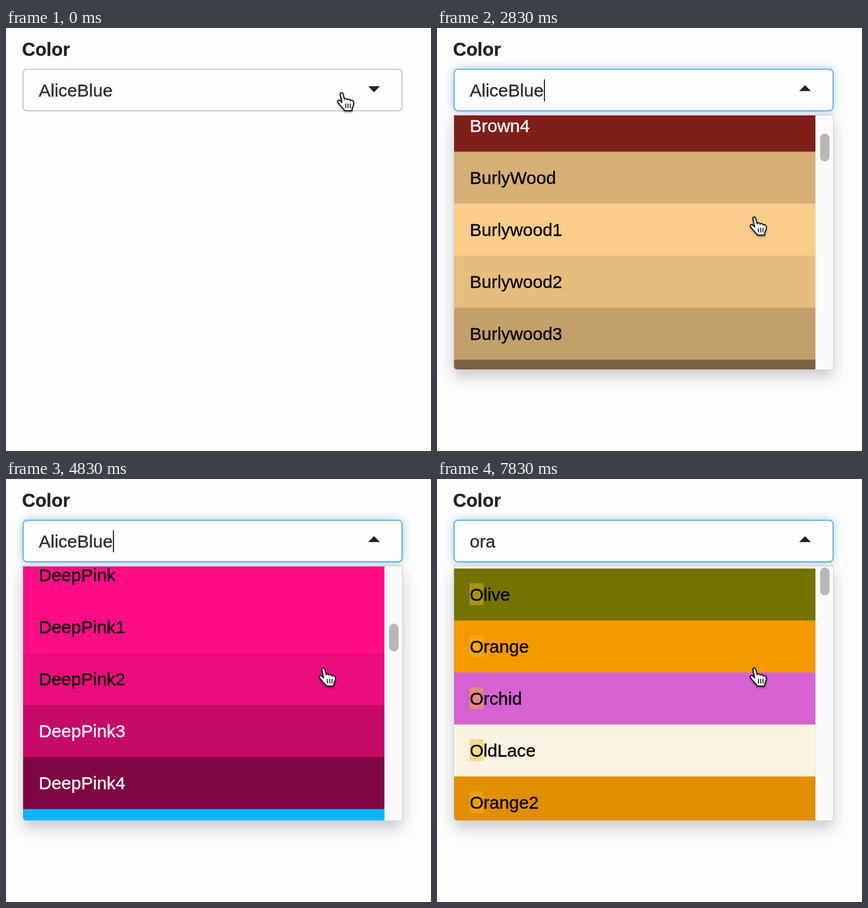
An HTML page that plays this animation: 720 px wide and 716 px high, repeating every 8000 ms.

```html
<!DOCTYPE html>
<html lang="en">
<head>
<meta charset="utf-8">
<title>Color select</title>
<style>
html, body { margin: 0; width: 100%; height: 100%; overflow: hidden; background: #fefdfe; }
svg { display: block; width: 100vw; height: 100vh; }
text {
  font: 30px "Liberation Sans", Arial, sans-serif; white-space: pre;
  fill: currentColor; stroke: currentColor; stroke-width: .4;
}
#label { font-size: 31px; font-weight: bold; color: #222; }
#value { color: #2d2d2f; }
#field { fill: #fefdfe; stroke: #c6c5c9; stroke-width: 1.9; }
#field.focus { stroke: #66a9e2; filter: drop-shadow(0 0 8px rgba(102, 175, 233, .6)); }
#panel { fill: #fefdfe; stroke: #d3d2d5; stroke-width: 1.5; filter: drop-shadow(0 12px 12px rgba(0, 0, 0, .2)); }
#hand { filter: drop-shadow(0 2px 1.5px rgba(0, 0, 0, .4)); }
</style>
</head>
<body>
<svg viewBox="0 0 720 716">
  <defs><clipPath id="view"><path d="M29 148H671V572q0 6 -6 6H35q-6 0 -6 -6Z"/></clipPath></defs>
  <text id="label" x="27.3" y="47">Color</text>
  <rect id="field" x="28.9" y="69.9" width="642.2" height="70.4" rx="7"/>
  <text id="value" x="55.5" y="115.7"></text>
  <path id="caret" d="M182 87V124" stroke="#333" stroke-width="2"/>
  <path id="arrow" fill="#222"/>
  <g id="menu">
    <path id="panel" d="M28.7 147.3H671.3V571q0 7.5 -7 7.5H35.7q-7 0 -7 -7.5Z"/>
    <g clip-path="url(#view)">
      <g id="all"></g>
      <g id="found"></g>
      <rect x="641" y="148" width="30" height="431" fill="#fafafb"/>
      <path d="M641.7 148V579" stroke="#e6e5e8"/>
      <rect id="thumb" x="649" width="16" height="47" rx="8" fill="#b9b7bb"/>
    </g>
  </g>
  <g id="hand" stroke="#111" stroke-width="1.9" stroke-linejoin="round" stroke-linecap="round">
    <path fill="#fff" d="M5.2 4.5C4.6 1 9 .2 10 3.6L12.6 13C13.6 10.6 16.8 11 17.4 13.6C18.8 11.6 22 12.2 22.5 15C24.2 13.4 27.4 14.6 28 18C28.5 22 27 25 25.5 27.5L25 32H12.5L11.8 30C8 27 5 22.5 1.2 17.8C-.4 14.8 2.8 13 5.2 15.2L8.2 18.2Z"/>
    <path fill="none" stroke-width="1.6" d="M14.3 20.5L14.8 27M18.3 20.3L18.6 27M22.3 20.3L22.4 27"/>
  </g>
</svg>
<script>
const $ = id => document.getElementById(id);
const ROW = 88, STEP = 1000 / 6, STEPS = 48;

// A colon marks a family with shades 1-4; the hex is shade 1 where it differs from the base.
const names = `AliceBlue AntiqueWhite:ffefdb Aqua Aquamarine: Azure: Beige Bisque: Black BlanchedAlmond
Blue: BlueViolet Brown:ff4040 BurlyWood:ffd39b CadetBlue:98f5ff Chartreuse: Chocolate:ff7f24 Coral:ff7256
CornflowerBlue Cornsilk: Crimson Cyan: DarkBlue DarkCyan DarkGoldenrod:ffb90f DarkGray DarkGreen DarkGrey
DarkKhaki DarkMagenta DarkOliveGreen:caff70 DarkOrange:ff7f00 DarkOrchid:bf3eff DarkRed DarkSalmon
DarkSeaGreen:c1ffc1 DarkSlateBlue DarkSlateGray:97ffff DarkSlateGrey DarkTurquoise DarkViolet DeepPink:
DeepSkyBlue: DimGray DimGrey DodgerBlue: FireBrick:ff3030 FloralWhite ForestGreen Fuchsia Gainsboro
GhostWhite Gold: Goldenrod:ffc125 Gray Gray0 Green Green0`.split(/\s+/);
const extra = { Gray0: '#bebebe', Green0: '#00ff00', Orange2: '#ee9a00' };
const shades = [1, .932, .804, .545];

const ctx = document.createElement('canvas').getContext('2d');
function rgb(color) {
  ctx.fillStyle = color;
  return [1, 3, 5].map(i => parseInt(ctx.fillStyle.slice(i, i + 2), 16));
}

// Slightly darker, shifted tones, as on a display with another colour profile.
function tone(color) {
  const [r, g, b] = color.map(v => 255 * (v / 255) ** 1.16);
  const yellow = Math.max(0, g - b), red = Math.max(0, r - 2 * Math.max(g, b));
  const out = [r > g ? r - .07 * yellow : r, g + .07 * red, Math.max(0, b - .07 * yellow)];
  return `rgb(${out.map(Math.round)})`;
}

function luminance(c) {
  const [r, g, b] = c.map(v => ((v / 255 + .055) / 1.055) ** 2.4);
  return .2126 * r + .7152 * g + .0722 * b;
}

function add(parent, tag, attrs, text = '') {
  const el = document.createElementNS('http://www.w3.org/2000/svg', tag);
  for (const k in attrs) el.setAttribute(k, attrs[k]);
  el.textContent = text;
  parent.append(el);
}

function addRow(group, i, name, color, marked) {
  const y = i * ROW;
  add(group, 'rect', { x: 29, y, width: 612, height: ROW + .5, fill: tone(color) });
  if (marked) add(group, 'rect', { x: 55, y: y + 25, width: 23.5, height: 37, fill: 'rgba(235,185,40,.45)' });
  add(group, 'text', { x: 55.5, y: y + 54.5, color: luminance(color) > .179 ? '#050505' : '#fff' }, name);
}

let count = 0;
for (const entry of names) {
  const [name, first] = entry.split(':');
  const base = rgb(extra[name] || name);
  addRow($('all'), count++, name, base);
  if (first === undefined) continue;
  const top = first ? rgb('#' + first) : base;
  const stem = name.replace('BurlyWood', 'Burlywood').replace('FireBrick', 'Firebrick');
  shades.forEach((k, n) => addRow($('all'), count++, stem + (n + 1), top.map(v => Math.round(v * k))));
}
['Olive', 'Orange', 'Orchid', 'OldLace', 'Orange2'].forEach((name, i) =>
  addRow($('found'), i, name, rgb(extra[name] || name), true));

// Scroll flicks: step, position, speed per step.
const flicks = [[9, 0, 0], [17, 3118, 500], [25, 7604, 600], [32, 12046, 500], [37, 13361, 0]];
function scrollAt(s) {
  if (s <= 9 || s >= 42) return 0;
  if (s >= 37) return 13361;
  const i = flicks.findIndex(f => f[0] > s);
  const [s0, p0, v0] = flicks[i - 1], [s1, p1, v1] = flicks[i];
  const d = s1 - s0, u = (s - s0) / d, w = 1 - u;
  return p0 * (1 + 2 * u) * w * w + v0 * d * u * w * w + p1 * u * u * (3 - 2 * u) - v1 * d * u * u * w;
}

function valueAt(s) {
  if (s < 41) return 'AliceBlue';
  return s < 43 ? '' : s < 46 ? 'o' : s < 47 ? 'or' : 'ora';
}

const show = (id, on) => $(id).setAttribute('visibility', on ? 'inherit' : 'hidden');
const move = (id, x, y) => $(id).setAttribute('transform', `translate(${x} ${y})`);

function draw(s) {
  const open = s >= 1, found = s >= 44, scroll = scrollAt(s);
  $('field').classList.toggle('focus', open);
  $('value').textContent = valueAt(s);
  $('arrow').setAttribute('d', open ? 'M613.5 106.7L623.5 96.7L633.5 106.7Z' : 'M613.5 98.5H633.5L623.5 108.7Z');
  show('caret', s >= 10 && s < 41);
  show('menu', open);
  show('all', !found);
  show('found', found);
  move('all', 0, 159.4 - scroll);
  move('found', 0, 151.5);
  $('thumb').setAttribute('y', 150 + scroll * .00925);
  const u = Math.min(1, Math.max(0, (s - 1) / 3)), k = u * u * (3 - 2 * u);
  move('hand', 561 - 31 * k, 108 + 210.5 * k);
}

let start, last = -1;
function tick(now) {
  start ??= now;
  const s = Math.floor((now - start + 4) / STEP) % STEPS;
  if (s !== last) draw(last = s);
  requestAnimationFrame(tick);
}
draw(0);
requestAnimationFrame(tick);
</script>
</body>
</html>
```
